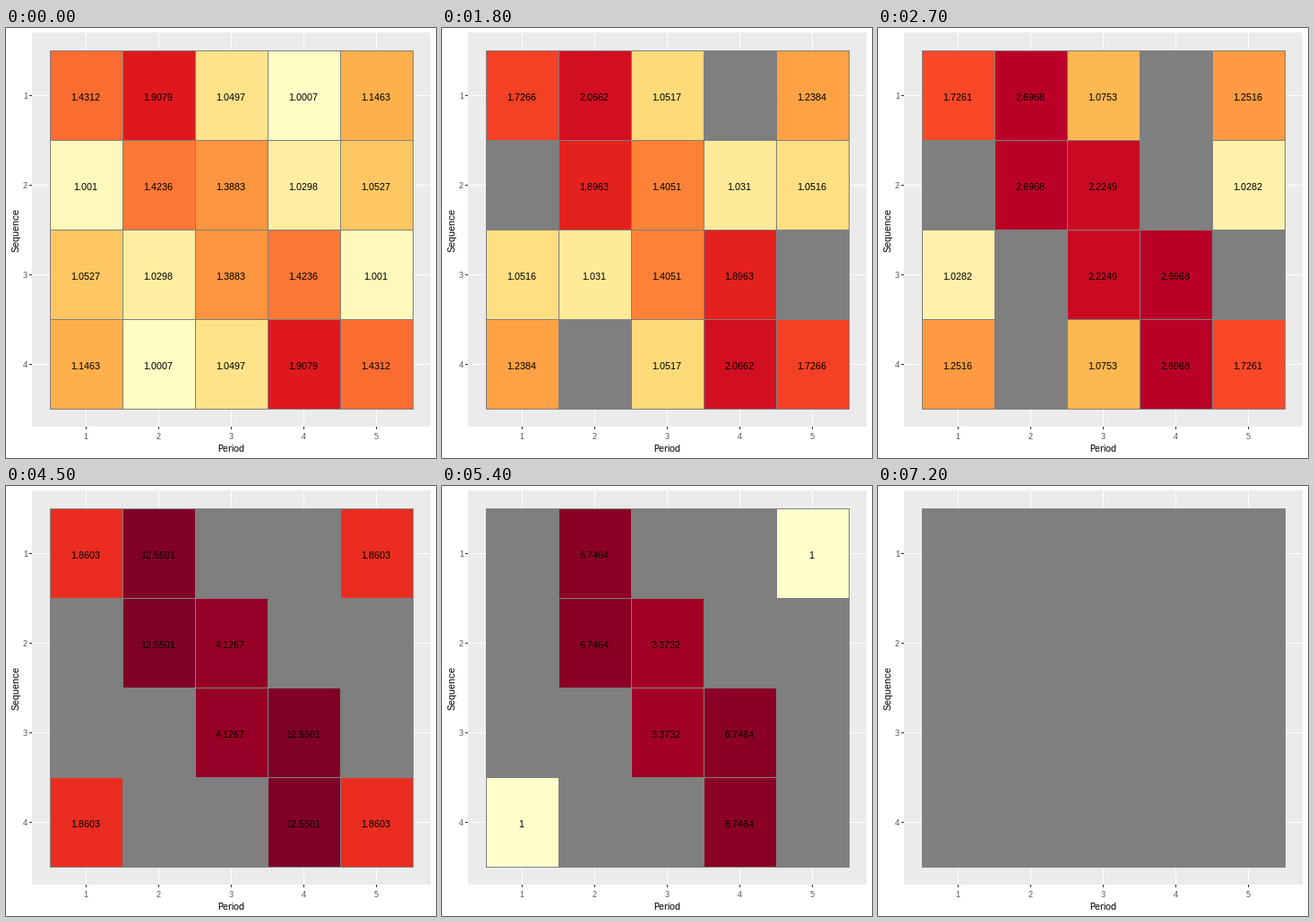
A matplotlib script for the animation above (9 s loop, 480 by 480 pixels).

```python
import numpy as np
import matplotlib.pyplot as plt
from matplotlib.animation import FuncAnimation
from matplotlib.patches import Rectangle

plt.rcParams.update({
    "font.family": "Liberation Sans",
    "text.hinting": "native",
    "text.hinting_factor": 1,
})

SIZE, DPI = 480, 100
ROWS, COLS = 4, 5
LEFT, TOP, CELL_W, CELL_H = 49, 25, 81, 100
GREY = "#7F7F7F"
YL_OR_RD = ["FFFFCC", "FFEDA0", "FED976", "FEB24C", "FD8D3C",
            "FC4E2A", "E31A1C", "BD0026", "800026"]

# Stepped wedge design: cluster size, intracluster correlation, decay per period
CLUSTER, ICC, DECAY = 100, 0.05, 0.95
LAG = np.abs(np.subtract.outer(np.arange(COLS), np.arange(COLS)))
COV = ICC * DECAY ** LAG + (1 - ICC) / CLUSTER * np.eye(COLS)


def information(mask):
    """Precision of the treatment effect from the cells that are kept."""
    total = np.zeros((COLS + 1, COLS + 1))
    for i in range(ROWS):
        kept = np.flatnonzero(mask[i])
        if len(kept):
            z = np.column_stack([kept > i, np.eye(COLS)[kept]]).astype(float)
            total += z.T @ np.linalg.solve(COV[np.ix_(kept, kept)], z)
    b = total[0, 1:]
    return total[0, 0] - b @ np.linalg.pinv(total[1:, 1:]) @ b


def drop_pair(mask, i, j):
    out = mask.copy()
    out[i, j] = out[ROWS - 1 - i, COLS - 1 - j] = False
    return out


def variance_ratios(mask):
    """Variance inflation when a cell and its mirror cell are left out."""
    full = information(mask)
    ratios = np.full((ROWS, COLS), np.nan)
    for i, j in zip(*np.nonzero(mask)):
        rest = information(drop_pair(mask, i, j))
        if rest > 1e-6 * full:
            ratios[i, j] = round(full / rest, 4)
    return ratios


def build_stages():
    mask = np.ones((ROWS, COLS), bool)
    stages = []
    while True:
        ratios = variance_ratios(mask)
        stages.append(ratios)
        if np.isnan(ratios).all():
            return stages
        i, j = np.unravel_index(np.nanargmin(ratios), ratios.shape)
        mask = drop_pair(mask, i, j)


# Colour ramp, blended in Lab space
TO_XYZ = np.array([[0.4124564, 0.3575761, 0.1804375],
                   [0.2126729, 0.7151522, 0.0721750],
                   [0.0193339, 0.1191920, 0.9503041]])
WHITE = TO_XYZ.sum(axis=1)
TO_LAB = np.array([[0, 116, 0], [500, -500, 0], [0, 200, -200]])


def rgb_to_lab(rgb):
    lin = np.where(rgb <= 0.04045, rgb / 12.92, ((rgb + 0.055) / 1.055) ** 2.4)
    t = lin @ TO_XYZ.T / WHITE
    f = np.where(t > 0.008856, np.cbrt(t), 7.787 * t + 16 / 116)
    return f @ TO_LAB.T - [16, 0, 0]


def lab_to_rgb(lab):
    fy = (lab[0] + 16) / 116
    f = np.array([fy + lab[1] / 500, fy, fy - lab[2] / 200])
    t = np.where(f > 0.206893, f ** 3, (f - 16 / 116) / 7.787)
    lin = np.clip(np.linalg.solve(TO_XYZ, t * WHITE), 0, 1)
    rgb = np.where(lin <= 0.0031308, 12.92 * lin,
                   1.055 * lin ** (1 / 2.4) - 0.055)
    return tuple(np.clip(rgb, 0, 1))


STOPS = rgb_to_lab(np.array([[int(c[k:k + 2], 16) / 255 for k in (0, 2, 4)]
                             for c in YL_OR_RD]))


def ramp(u):
    pos = u * (len(STOPS) - 1)
    knots = np.arange(len(STOPS))
    return lab_to_rgb(np.array([np.interp(pos, knots, s) for s in STOPS.T]))


stages = build_stages()
levels = np.unique([v for s in stages for v in s.ravel() if not np.isnan(v)])


def fill_colour(value):
    if np.isnan(value):
        return GREY
    return ramp(np.searchsorted(levels, value) / (len(levels) - 1))


fig = plt.figure(figsize=(SIZE / DPI, SIZE / DPI), dpi=DPI, facecolor="white")
ax = fig.add_axes([0, 0, 1, 1])
ax.set(xlim=(0, SIZE), ylim=(SIZE, 0))
ax.axis("off")


def box(x, y, w, h, colour, z=1):
    return ax.add_patch(Rectangle((x, y), w, h, fc=colour, lw=0,
                                  antialiased=False, zorder=z))


def label(x, y, text, px, colour="black", ha="center", **kw):
    return ax.text(x, y, text, fontsize=px * 72 / DPI, color=colour,
                   ha=ha, va=kw.pop("va", "baseline"), zorder=5, **kw)


box(29, 5, 445, 440, "#EBEBEB", 0)
for j in range(COLS):
    x = LEFT + CELL_W * j + 40
    box(x, 5, 1, 440, "white")
    box(x, 445, 1, 3, "#333333")
    label(x, 459, str(j + 1), 9, "#4D4D4D")
for i in range(ROWS):
    y = TOP + CELL_H * i + 50
    box(29, y, 445, 1, "white")
    box(26, y, 3, 1, "#333333")
    label(24, y + 4, str(i + 1), 9, "#4D4D4D", ha="right")
label(251.5, 473, "Period", 11)
label(11.5, 225.5, "Sequence", 11, rotation=90, va="center")

tiles, values = {}, {}
for i, j in np.ndindex(ROWS, COLS):
    x, y = LEFT + CELL_W * j, TOP + CELL_H * i
    tiles[i, j] = box(x, y, CELL_W, CELL_H, GREY, 2)
    values[i, j] = label(x + 39.5, y + 56, "", 11)
for j in range(COLS + 1):
    box(LEFT + CELL_W * j, TOP, 1, CELL_H * ROWS + 1, GREY, 3)
for i in range(ROWS + 1):
    box(LEFT, TOP + CELL_H * i, CELL_W * COLS + 1, 1, GREY, 3)


def update(frame):
    stage = stages[min(frame, len(stages) - 1)]
    for cell, value in np.ndenumerate(stage):
        tiles[cell].set_facecolor(fill_colour(value))
        values[cell].set_text("" if np.isnan(value) else f"{value:.6g}")
    return [*tiles.values(), *values.values()]


anim = FuncAnimation(fig, update, frames=10, interval=900,
                     repeat=True, repeat_delay=0, blit=False)
plt.show()
```
